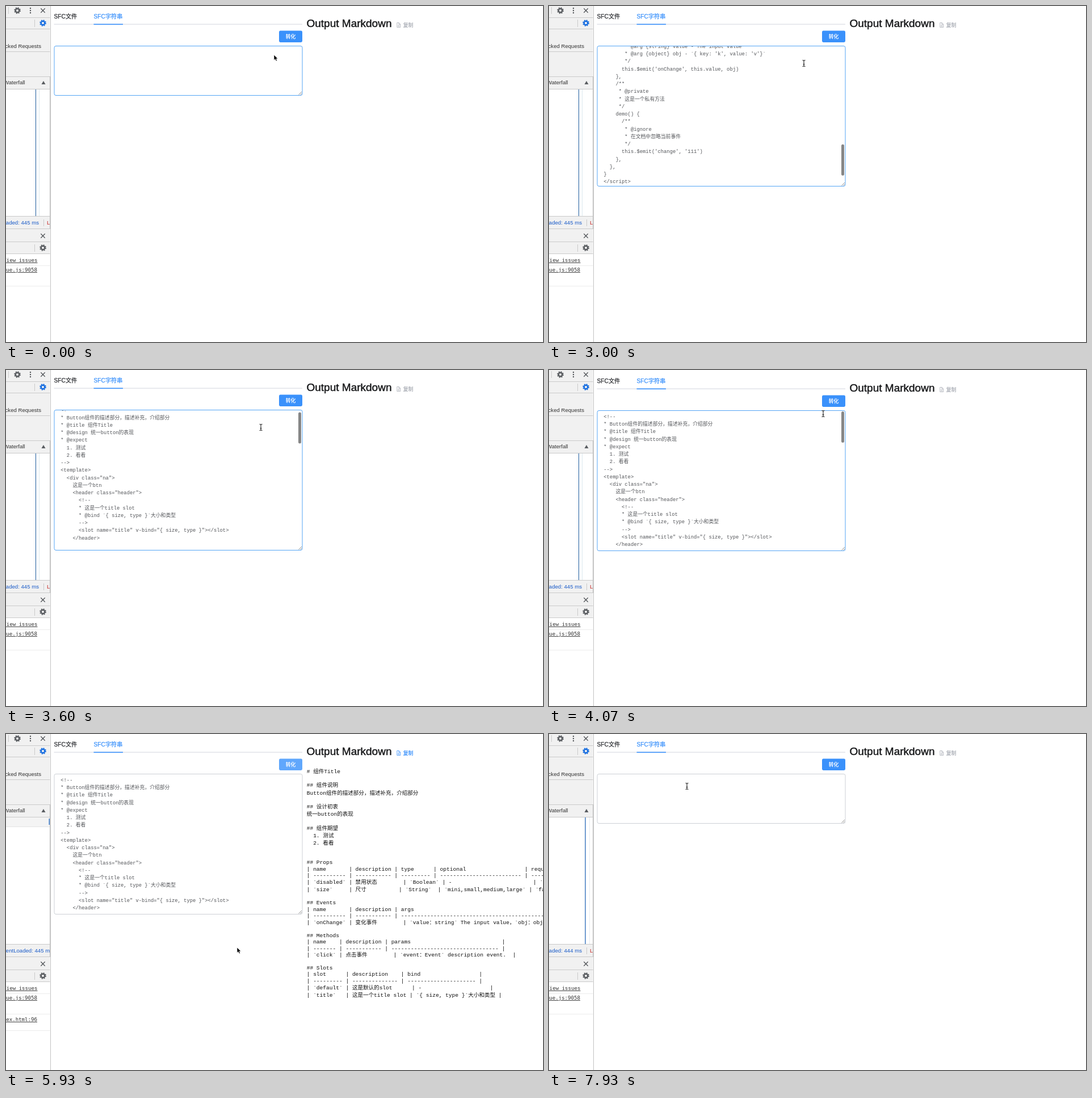
An HTML page for the animation above (8000 ms loop, 946 by 592 pixels).

```html
<!DOCTYPE html>
<html lang="zh-CN">
<head>
<meta charset="utf-8">
<style>
  html, body { margin: 0; width: 100%; height: 100%; overflow: hidden; background: #fff; }
  svg { display: block; width: 946px; height: 592px; }
  text { white-space: pre; }
  .ui { font-family: "Liberation Sans", "Noto Sans CJK SC", "Noto Sans CJK", sans-serif; }
  .code { font-family: "Liberation Mono", "Noto Sans CJK SC", "Noto Sans CJK", monospace; }
  .link { font-family: "DejaVu Sans Mono", monospace; text-decoration: underline; }
  .medium { font-weight: 500; stroke: currentColor; stroke-width: .25px; }
</style>
</head>
<body>
<svg id="stage" viewBox="0 0 946 592" xmlns="http://www.w3.org/2000/svg"></svg>
<script>
const LOOP = 8000, STEP = 200 / 3, LINE = 13.25, MAX_SCROLL = 785;
const BLUE = '#3a91fb', HOVER = '#60a7fc';

const code = `<\!--
* Button组件的描述部分，描述补充，介绍部分
* @title 组件Title
* @design 统一button的表现
* @expect
  1. 测试
  2. 看看
-->
<template>
  <div class="na">
    这是一个btn
    <header class="header">
      <\!--
      * 这是一个title slot
      * @bind \`{ size, type }\`大小和类型
      -->
      <slot name="title" v-bind="{ size, type }"></slot>
    </header>

    <\!--
    * 这是默认的slot
    -->
    <slot></slot>
  </div>
</template>
<\script>
export default {
  name: 'Button',
  props: {
    /**
     * 禁用状态
     */
    disabled: Boolean,
    /**
     * 尺寸
     * \`mini,small,medium,large\`
     */
    size: {
      type: String,
      default: 'small'
    }
  },
  methods: {
    /**
     * @public
     * 点击事件
     * @param {Event} event description event.
     */
    click(event) {
      console.log(event)
    },
    /**
     * 变化事件
     */
    onChange() {
      /**
       * 变化事件
       * @arg {string} value - The input value
       * @arg {object} obj - \`{ key: 'k', value: 'v'}\`
       */
      this.$emit('onChange', this.value, obj)
    },
    /**
     * @private
     * 这是一个私有方法
     */
    demo() {
      /**
       * @ignore
       * 在文档中忽略当前事件
       */
      this.$emit('change', '111')
    },
  },
}
<\/script>`.split('\n');

function table(rows) {
  const widths = rows[0].map((_, c) => Math.max(...rows.map(r => r[c].length)));
  const all = [rows[0], widths.map(w => '-'.repeat(w)), ...rows.slice(1)];
  return all.map(r => '| ' + r.map((cell, c) => cell.padEnd(widths[c])).join(' | ') + ' |');
}

const markdown = [
  '# 组件Title', '## 组件说明', 'Button组件的描述部分，描述补充，介绍部分',
  '## 设计初衷', '统一button的表现', '## 组件期望', '  1. 测试', '  2. 看看',
  '## Props', ...table([
    ['name', 'description', 'type', 'optional', 'required', 'default'],
    ['`disabled`', '禁用状态', '`Boolean`', '-', '`false`', '-'],
    ['`size`', '尺寸', '`String`', '`mini,small,medium,large`', '`false`', '`small`']]),
  '## Events', ...table([
    ['name', 'description', 'args'],
    ['`onChange`', '变化事件', "`value：string` The input value，`obj：object` `{ key: 'k', value: 'v'}`"]]),
  '## Methods', ...table([
    ['name', 'description', 'params'],
    ['`click`', '点击事件', '`event：Event` description event.'.padEnd(33)]]),
  '## Slots', ...table([
    ['slot', 'description', 'bind'],
    ['`default`', '这是默认的slot', '-'],
    ['`title`', '这是一个title slot', '`{ size, type }`大小和类型']]),
];
const markdownY = [66, 90, 103.5, 128, 141, 165.5, 179, 192, 226, 237.5, 249, 260.5, 274,
  297, 308.5, 320, 331.5, 354.5, 366, 377.5, 389, 412, 423, 434.5, 446.5, 460];

// Markup helpers; text is placed by its vertical middle.
const esc = s => s.replace(/&/g, '&amp;').replace(/</g, '&lt;');
const text = (x, mid, size, fill, str, cls = 'ui', extra = '') =>
  `<text x="${x}" y="${mid + size * .34}" font-size="${size}" fill="${fill}" color="${fill}" class="${cls}" ${extra}>${esc(str)}</text>`;
const endText = (x, mid, size, fill, str, cls, extra = '') =>
  text(x, mid, size, fill, str, cls, 'text-anchor="end" ' + extra);
const rect = (x, y, w, h, fill, extra = '') =>
  `<rect x="${x}" y="${y}" width="${w}" height="${h}" fill="${fill}" ${extra}/>`;
const path = (d, stroke, width = 1, extra = '') =>
  `<path d="${d}" fill="none" stroke="${stroke}" stroke-width="${width}" ${extra}/>`;
const gear = (x, y, color) => `<g fill="none" stroke="${color}">
  <circle cx="${x}" cy="${y}" r="3.3" stroke-width="2.5"/>
  <circle cx="${x}" cy="${y}" r="5" stroke-width="1.7" stroke-dasharray="2.1 1.83"/></g>`;
const cross = (x, y) => path(`M${x - 3.7} ${y - 3.7}l7.4 7.4m0-7.4l-7.4 7.4`, '#505357', 1.3);
const rule = (y, color = '#cacaca') => rect(0, y, 78, 1, color);

const devtools = `<g clip-path="url(#panel)">
  ${rect(0, 0, 78, 146, '#f1f1f1')}${rect(0, 371, 78, 66, '#f1f1f1')}
  ${[20, 40, 80, 124, 146, 370, 392, 415, 436].map(y => rule(y)).join('')}
  ${[457, 493].map(y => rule(y, '#ececec')).join('')}
  ${rect(4, 2, 1, 12, '#cacaca')}${rect(50, 24, 1, 13, '#cacaca')}${rect(50, 420, 1, 13, '#cacaca')}
  ${gear(20, 8, '#5a5d61')}${gear(65, 30, '#1a6fe0')}${gear(65, 426, '#5a5d61')}
  ${[4, 8, 12].map(y => `<circle cx="43" cy="${y}" r="1.2" fill="#505357"/>`).join('')}
  ${cross(65, 8)}${cross(65, 405)}
  ${endText(62, 71, 9.6, '#333', 'Blocked Requests')}
  ${endText(33.5, 135, 9.6, '#333', 'Waterfall')}
  <path d="M62.5 138h7l-3.5-6z" fill="#5a5d61"/>
  <g id="netBefore">${rect(52, 147, 1, 223, '#1d5c9d')}${rect(58, 147, 1, 223, '#dbe8ef')}</g>
  <g id="netAfter">${rect(0, 147, 78, 17, '#f4f4f4')}${rule(163, '#e4e4e4')}${rect(75.5, 149, 2, 11, '#3f7fd0')}</g>
  <g id="netReload">${rect(63.3, 147, 1.4, 223, '#3572bd')}${rect(71, 147, 1, 223, '#e6ecf0')}</g>
  ${endText(58, 382, 9.6, '#1a5bc8', '', 'ui', 'id="loaded"')}
  <g id="loadTime">${rect(66, 376, 1, 12, '#cacaca')}${text(72, 382, 9.6, '#c5221f', 'Load')}</g>
  ${endText(55.5, 448, 9.1, '#333', 'View issues', 'link')}
  ${endText(55, 465, 9.1, '#333', 'vue.js:9058', 'link')}
  <g id="log">${endText(55, 503, 9.1, '#333', 'index.html:96', 'link')}${rule(522, '#ececec')}</g>
  </g>${rect(78, 0, 1, 592, '#c3c3c3')}${rect(77, 124, 1, 269, '#c3c3c3')}`;

const app = `<g id="app">
  ${text(84.5, 18.5, 10.2, '#2b2d31', 'SFC文件', 'ui medium')}
  ${text(154.5, 18.5, 10.2, BLUE, 'SFC字符串', 'ui medium')}
  ${rect(84.5, 31.5, 437.5, 1.4, '#dfe2e8')}${rect(154.5, 31.5, 51.5, 1.6, BLUE)}
  ${rect(481, 43.5, 41, 20.5, BLUE, 'rx="2.4" id="button"')}
  ${text(501.5, 53.8, 8.9, '#fff', '转化', 'ui medium', 'text-anchor="middle"')}
  ${rect(85, 70.5, 437, 87, '#fff', 'rx="3" id="box"')}
  <g clip-path="url(#editor)"><g id="code">
    ${code.map((line, i) => text(96.3, 81 + i * LINE, 8.82, '#54565a', line, 'code')).join('')}</g>
    ${rect(96, 76, 1, 10, '#444', 'id="caret"')}</g>
  ${rect(515, 72, 5, 55, '#868686', 'rx="2.5" id="thumb"')}
  <g id="grip">${path('M515.5 156.5l5.5-5.5M518.5 156.5l2.5-2.5', '#777', .8)}</g>
  ${text(529.5, 31, 19, '#17181a', 'Output Markdown', 'ui medium', 'style="stroke-width:.45px"')}
  <g id="copy" color="#a9adb5">
    ${path('M688.8 29.5h3.4l2.6 2.6v5.4h-6zM692 29.7v2.6h2.6M690.2 34h3.2M690.2 35.8h3.2', 'currentColor', .8)}
    <text x="699.7" y="36.7" font-size="8.9" fill="currentColor" class="ui medium">复制</text></g>
  <g id="output">
    ${markdown.map((line, i) => text(529.7, markdownY[i], 9.55, '#111', line, 'code')).join('')}</g>
  </g>`;

const pointers = `<g id="pointer">
  <path id="arrow" d="M0 0v9.6l2.2-2 1.5 3.5 1.8-.8-1.5-3.4h3z" fill="#000" stroke="#fff" stroke-width=".7"/>
  <g id="beam">${path('M-2.5-5.5q2 0 2.5 1q.5-1 2.5-1M0-4.5v9M-2.5 5.5q2 0 2.5-1q.5 1 2.5 1M-1.3 1.6h2.6', '#222', 1.1)}</g>
  <path id="hand" d="M-1 0q1-1.2 2 0v4l5 1q1.2.4 1 2l-1 4.5h-6l-3.5-5q.5-1.5 2.5 0z" fill="#fff" stroke="#000" stroke-width=".9"/>
  </g>`;

document.getElementById('stage').innerHTML = `<defs>
  <clipPath id="panel"><rect width="77.5" height="592"/></clipPath>
  <clipPath id="editor"><rect x="86" y="71" width="435" height="246"/></clipPath></defs>
  ${app}${devtools}${pointers}`;

const el = id => document.getElementById(id);
const show = (id, on) => el(id).setAttribute('display', on ? 'inline' : 'none');
const set = (id, attrs) => Object.entries(attrs).forEach(([k, v]) => el(id).setAttribute(k, v));
const smooth = p => { p = Math.min(1, Math.max(0, p)); return p * p * (3 - 2 * p); };

// time, x, y
const route = [
  [0, 472, 86], [67, 472, 86], [670, 330, 120], [867, 330, 120], [1133, 301, 109], [1267, 289, 98],
  [1400, 294, 104], [2333, 294, 104], [2600, 494, 74], [2800, 449, 101], [3800, 449, 101],
  [4066, 483, 77], [4333, 500, 54], [5133, 500, 54], [5530, 440, 330], [5930, 407, 376],
  [6400, 399, 392], [6530, 403, 397], [7400, 403, 397], [7733, 304, 178], [7800, 304, 178],
  [7866, 270, 130], [7930, 243, 92], [LOOP, 243, 92]];

function pointerAt(t) {
  const i = Math.max(1, route.findIndex(k => k[0] >= t));
  const [t0, x0, y0] = route[i - 1], [t1, x1, y1] = route[i];
  const p = smooth((t - t0) / (t1 - t0));
  return [x0 + (x1 - x0) * p, y0 + (y1 - y0) * p];
}

function draw(time) {
  const t = Math.floor((time + 4) / STEP) * STEP + .5;
  const within = (a, b) => t >= a && t < b;
  const filled = within(2000, 7466), converted = within(4733, 7466);
  const focused = t < 4733, bottom = filled ? 317.5 : 157.5;

  const [x, y] = pointerAt(t);
  const onButton = x > 481 && x < 522 && y > 43 && y < 64;
  const onEditor = t > 60 && x > 85 && x < 522 && y > 70 && y < bottom;
  set('pointer', { transform: `translate(${x.toFixed(2)} ${y.toFixed(2)})` });
  show('beam', onEditor);
  show('hand', onButton);
  show('arrow', !onEditor && !onButton);

  const scroll = MAX_SCROLL * (1 - smooth((t - 2933) / 717));
  set('app', { transform: `translate(0 ${within(3866, 4600) ? 1 : 0})` });
  set('box', { height: bottom - 70.5, stroke: focused ? '#55a5f5' : '#cdd0d6' });
  set('grip', { transform: `translate(0 ${bottom - 157.5})` });
  set('button', { fill: onButton || converted ? HOVER : BLUE });
  set('code', { transform: `translate(0 ${-scroll})` });
  set('thumb', { y: 72 + scroll * .2245 });
  set('caret', { y: filled ? 76 + code.length * LINE - scroll : 76 });
  set('copy', { color: converted ? BLUE : '#a9adb5' });
  show('code', filled);
  show('thumb', within(3000, 4666));
  show('caret', within(600, 1133) || within(1666, 2533) || within(3066, 3600));
  show('output', converted);

  const reloaded = t >= 7466;
  show('netBefore', focused);
  show('netAfter', within(4733, 7000));
  show('netReload', reloaded);
  show('loadTime', focused || reloaded);
  show('log', within(4733, 7000));
  show('loaded', !within(7000, 7466));
  set('loaded', { x: within(4733, 7000) ? 82 : 58 });
  el('loaded').textContent = `DOMContentLoaded: ${reloaded ? 444 : 445} ms`;
}

const start = performance.now();
function tick() {
  draw((performance.now() - start) % LOOP);
  requestAnimationFrame(tick);
}
tick();
</script>
</body>
</html>
```
